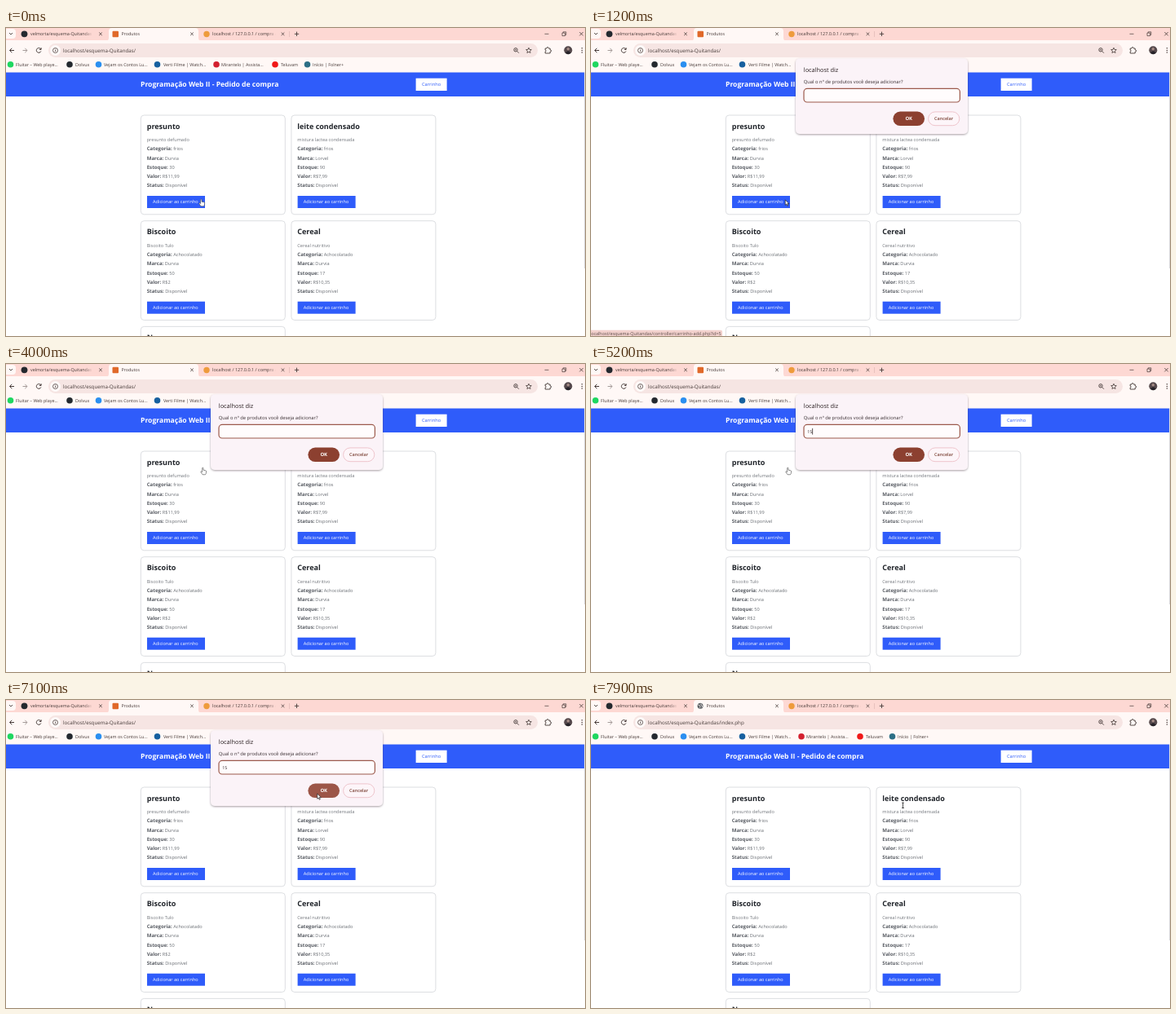
Animation, 710 px wide and 378 px high, one loop 8 s. Source, as an HTML page:

```html
<!DOCTYPE html>
<html lang="pt-BR">
<head>
<meta charset="utf-8">
<title>Pedido de compra</title>
<style>
html, body { margin: 0; width: 100%; height: 100%; overflow: hidden; background: #fff; }
svg { display: block; width: 100%; height: 100%; font-family: "Open Sans", "Noto Sans", sans-serif; text-rendering: geometricPrecision; }
text { white-space: pre; }
</style>
</head>
<body>
<svg id="stage" viewBox="0 0 710 378" xmlns="http://www.w3.org/2000/svg"></svg>
<script>
const LOOP = 8000;
const BLUE = '#2f5cfa', STRIP = '#fdd8d3', BAR = '#fff8f6', INK = '#463a38', BROWN = '#8c4030';
const SITE = 'localhost/esquema-Quitandas/';

const attrs = o => Object.entries(o).map(([k, v]) => ` ${k}="${v}"`).join('');
const rect = (x, y, w, h, fill, o = {}) =>
  `<rect x="${x}" y="${y}" width="${w}" height="${h}" fill="${fill}"${attrs(o)}/>`;
const dot = (x, y, r, fill, o = {}) => `<circle cx="${x}" cy="${y}" r="${r}" fill="${fill}"${attrs(o)}/>`;
const line = (d, stroke = INK, w = 1, o = {}) =>
  `<path d="${d}" fill="none" stroke="${stroke}" stroke-width="${w}"${attrs(o)}/>`;
const text = (x, y, size, fill, s, o = {}) =>
  `<text x="${x}" y="${y}" font-size="${size}" fill="${fill}"${attrs(o)}>${s}</text>`;
const group = (id, body, o = {}) => `<g id="${id}"${attrs(o)}>${body}</g>`;
const cross = (x, y, r, w = .8) => line(`M${x - r} ${y - r}l${2 * r} ${2 * r}m0 ${-2 * r}l${-2 * r} ${2 * r}`, INK, w);

function tabStrip() {
  const fade = x => rect(x, 2, 12, 11, 'url(#fadeStrip)');
  return rect(0, 0, 710, 16, STRIP) +
    rect(-2, 1, 14, 12, BAR, { rx: 4 }) + line('M4 6l2 2l2 -2', INK, .9) +
    dot(22.5, 7.3, 3.9, '#24292f') +
    text(30, 9.2, 5.4, INK, 'velmorta/esquema-Quitandas') + fade(96) + cross(116, 7.3, 1.8) +
    `<path d="M122 16q4 0 4 -4v-8q0 -4 4 -4h102q4 0 4 4v8q0 4 4 4z" fill="${BAR}"/>` +
    rect(130.5, 3.7, 7.5, 7.5, '#e0692a', { id: 'favicon', rx: 1 }) +
    group('globe', dot(134, 7.3, 3.5, '#5c6064') +
      line('M131.2 6l2 .4l.8 1.8l-1 1.5M135.2 4.6l-.4 1.4l1.8 1.2l-.6 1.8', '#e9e4e4', .9)) +
    text(141.5, 9.2, 5.3, INK, 'Produtos') + cross(228, 7.3, 1.8) +
    dot(246, 7.5, 3.7, '#ee9b3c') +
    text(253, 9.2, 5.5, INK, 'localhost / 127.0.0.1 / compra /') + fade(321) + cross(339.5, 7.3, 1.8) +
    line('M347.5 4v7', '#dfb9b5', .7) + line('M356.5 4.6v5.4m-2.7 -2.7h5.4', INK, .9) +
    line('M660.5 7.3h5', INK, .7) +
    line('M682 6h3.6v3.6h-3.6zM683.2 6v-1.2h3.6v3.6h-1.2', INK, .7) + cross(705.5, 7.2, 2.2, .8);
}

function toolbar() {
  const star = Array.from({ length: 10 }, (_, i) => {
    const a = -Math.PI / 2 + i * Math.PI / 5, r = i % 2 ? 1.6 : 3.5;
    return (641 + r * Math.cos(a)).toFixed(2) + ' ' + (27.7 + r * Math.sin(a)).toFixed(2);
  }).join('L');
  return rect(0, 15, 710, 39.5, BAR) +
    line('M10 27.5h-5.4m2.6 -2.7l-2.7 2.7l2.7 2.7') +
    line('M20.5 27.5h5.4m-2.6 -2.7l2.7 2.7l-2.7 2.7', '#a59b99') +
    group('reload', line('M42.7 25.9a2.9 2.9 0 1 0 .2 2.6M43.1 24.2v2.2h-2.2')) +
    group('stop', cross(40.2, 27.4, 2.4, 1)) +
    rect(52, 19, 600, 17, '#f6e5e3', { rx: 8.5 }) + dot(60.5, 27.5, 6.5, '#fffaf9') +
    dot(60.5, 27.5, 3, 'none', { stroke: INK, 'stroke-width': .8 }) + line('M60.5 27.2v1.8m0 -3.3v.8', INK, .8) +
    text(70, 29.7, 6.2, INK, SITE, { id: 'url' }) +
    dot(625, 26.8, 2.2, 'none', { stroke: INK, 'stroke-width': .9 }) + line('M626.6 28.4l2.3 2.3M624 26.8h2', INK, .9) +
    line(`M${star}Z`, INK, .8) +
    line('M661.2 25h2v-.5a1 1 0 0 1 2 0v.5h2v2h.5a1 1 0 0 1 0 2h-.5v2h-6v-2a1 1 0 0 0 0 -2z', INK, .9) +
    dot(689.3, 27.3, 5, '#55494c') + dot(689.3, 25.8, 1.7, '#a58c86') +
    '<path d="M685.9 30.8q3.4 -5 6.8 0q-3.4 2.8 -6.8 0z" fill="#262329"/>' +
    [24.8, 27.4, 30].map(y => dot(706.3, y, .75, INK)).join('');
}

function bookmarks() {
  const items = [
    [5.5, '#1ed760', 12, 'Fluitar – Web playe...'],
    [78, '#24292f', 85, 'Dolvux'],
    [113.5, '#2a8ff0', 120, 'Vejam os Contos Lu...'],
    [185.5, '#17609f', 193, 'Verti Filme | Watch...'],
    [258, '#d3202f', 264, 'Mirantelo | Assista...'],
    [330, '#f01818', 337, 'Teluvam'],
    [369.5, '#2c6f86', 376, 'Início | Folner+']
  ];
  return items.map(([ix, color, x, s]) => dot(ix, 44.8, 3.8, color) + text(x, 46.8, 5.4, INK, s)).join('');
}

function card(x, y, name, about, kind, brand, stock, price) {
  const tx = x + 7.7;
  const frame = rect(x + .3, y, 177, 121.8, '#fff', { rx: 4, stroke: '#d9dbde', 'stroke-width': .9 }) +
    text(tx, y + 16.6, 9, '#20242a', name, { 'font-weight': 700 });
  if (!about) return frame;
  const rows = [['Categoria', kind], ['Marca', brand], ['Estoque', stock], ['Valor', 'R$' + price], ['Status', 'Disponível']];
  return frame + text(tx, y + 32.2, 5.6, '#74787e', about) +
    rows.map(([k, v], i) => text(tx, y + 43.4 + i * 11.25, 5.6, '#6a6e74',
      `<tspan font-size="6.1" font-weight="700" fill="#5a5e65">${k}:</tspan> ${v}`)).join('') +
    rect(x + 8, y + 99, 71, 15, BLUE) +
    text(tx + 7.4, y + 108.2, 5.55, '#fff', 'Adicionar ao carrinho', { 'font-weight': 500 });
}

function page() {
  return rect(0, 54, 710, 324, '#fff') + rect(0, 54, 709, 30, BLUE) +
    text(165, 72.4, 8.58, '#fff', 'Programação Web II - Pedido de compra', { 'font-weight': 700 }) +
    rect(502.6, 61.7, 38, 15.3, '#fff') + text(510, 71, 5.65, BLUE, 'Carrinho') +
    card(165, 107, 'presunto', 'presunto defumado', 'frios', 'Durvia', 30, '11,99') +
    card(349.6, 107, 'leite condensado', 'mistura lactea condensada', 'frios', 'Lorvel', 90, '7,99') +
    card(165, 236.7, 'Biscoito', 'Biscoito Tulo', 'Achocolatado', 'Durvia', 50, '2') +
    card(349.6, 236.7, 'Cereal', 'Cereal nutritivo', 'Achocolatado', 'Durvia', 17, '10,35') +
    card(165, 366.4, 'Novo') +
    rect(709, 54, 1, 241, '#dcdce0');
}

function dialog() {
  return rect(251, 37.3, 211, 92.7, '#fbf3f8', { rx: 5, filter: 'url(#shadow)' }) +
    text(260.8, 54.4, 7.35, '#2b2022', 'localhost diz', { 'font-weight': 500 }) +
    text(260.8, 68.1, 5.8, '#3a2f33', 'Qual o nº de produtos você deseja adicionar?') +
    rect(261, 74.4, 191.4, 16.6, '#fffcfd', { rx: 4, stroke: '#9c5a4c', 'stroke-width': 1.2 }) +
    text(265.3, 84.7, 5.2, '#33282a', '', { id: 'typed' }) +
    rect(265.2, 79, .8, 7.6, '#33282a', { id: 'caret' }) +
    rect(370.4, 102.6, 38.6, 17.4, BROWN, { id: 'ok', rx: 8.7 }) +
    text(389.7, 113.4, 5.9, '#fff', 'OK', { 'font-weight': 700, 'text-anchor': 'middle' }) +
    rect(413.6, 102.9, 38.2, 16.8, '#fdf5f9', { rx: 8.4, stroke: '#ecc0c8', 'stroke-width': .9 }) +
    text(432.6, 113.3, 5.5, '#7d4438', 'Cancelar', { 'font-weight': 600, 'text-anchor': 'middle' });
}

const cursors =
  group('hand', '<path d="M-1.6 -4.6q.9 -.9 1.6 0v3l3.4 .8q1 .3 .9 1.4l-.6 3.2l-.8 1.2h-4l-2.6 -3.6q-.2 -1.3 1 -1l1.1 .8z" fill="#fff" stroke="#444" stroke-width=".7" stroke-linejoin="round" transform="scale(.85)"/>') +
  group('arrow', '<path d="M-1.8 -3.6v6.4l1.5 -1.3l1 2.3l1.1 -.5l-1 -2.2h2z" fill="#fff" stroke="#222" stroke-width=".7" stroke-linejoin="round"/>') +
  group('beam', line('M-1.4 -3.2h2.8M-1.4 3.2h2.8M0 -3.2v6.4', '#222', .8));

const $ = id => document.getElementById(id);
$('stage').innerHTML = `<defs>
  <linearGradient id="fadeStrip"><stop stop-color="${STRIP}" stop-opacity="0"/><stop offset=".85" stop-color="${STRIP}"/></linearGradient>
  <filter id="shadow" x="-10%" y="-10%" width="120%" height="130%"><feDropShadow dx="0" dy="1" stdDeviation="1.3" flood-color="#503c46" flood-opacity=".5"/></filter>
  </defs>` + page() + tabStrip() + toolbar() + bookmarks() +
  group('status', rect(-4, 370.8, 165, 10, '#f2d1cd', { rx: 2 }) +
    text(-1.2, 376.9, 5.4, '#5d4c4a', SITE + 'controller/carrinho-add.php?id=5')) +
  group('dialog', dialog()) + group('cursor', cursors);

const clamp = v => Math.max(0, Math.min(1, v));
const ramp = (t, a, b) => clamp((t - a) / (b - a));
const between = (t, a, b) => t >= a && t < b;
const show = (id, on) => $(id).setAttribute('visibility', on ? 'visible' : 'hidden');

// time, x, y
const path = [
  [0, 240, 214.5], [1300, 240, 214.5], [1800, 273, 178], [2200, 262, 137], [2700, 242, 131.5],
  [6300, 242, 131.5], [7000, 383.5, 118.5], [7500, 383.5, 118.5], [7800, 382.5, 129.3], [LOOP, 382.5, 129.3]
];
function pointer(t) {
  const i = Math.max(1, path.findIndex(k => k[0] > t));
  const [t0, x0, y0] = path[i - 1], [t1, x1, y1] = path[i];
  const p = ramp(t, t0, t1), e = p * p * (3 - 2 * p);
  return [x0 + (x1 - x0) * e, y0 + (y1 - y0) * e];
}

const caretOn = [[700, 1000], [1500, 2000], [2500, 3000], [3300, 4000], [4600, 6000]];

function draw(time) {
  const t = Math.floor(time / 100) * 100;
  const opened = ramp(t, 500, 900), closed = ramp(t, 7400, 7700);
  $('dialog').setAttribute('opacity', opened * (1 - closed));
  $('dialog').setAttribute('transform', `translate(0 ${-8 * (1 - opened) - 6 * closed})`);
  $('status').setAttribute('opacity', ramp(t, 100, 300) * (1 - ramp(t, 2300, 2600)));

  const typed = t < 5000 ? '' : t < 5200 ? '1' : '15';
  $('typed').textContent = typed;
  $('caret').setAttribute('x', 265.2 + typed.length * 3.05);
  show('caret', caretOn.some(([a, b]) => between(t, a, b)));

  const [x, y] = pointer(t);
  $('cursor').setAttribute('transform', `translate(${x} ${y})`);
  const beam = t >= 7700;
  const hand = t < 1200 || between(t, 2600, 6400);
  show('hand', hand);
  show('beam', beam);
  show('arrow', !hand && !beam);
  $('ok').setAttribute('fill', x > 371 ? '#9c5648' : BROWN);

  const loaded = t >= 7600;
  $('url').textContent = SITE + (loaded ? 'index.php' : '');
  show('favicon', !loaded);
  show('globe', loaded);
  const loading = between(t, 7600, 7800);
  show('stop', loading);
  show('reload', !loading);
}

const start = performance.now();
function tick(now) {
  draw(Math.max(0, now - start) % LOOP);
  requestAnimationFrame(tick);
}
draw(0);
requestAnimationFrame(tick);
</script>
</body>
</html>
```
